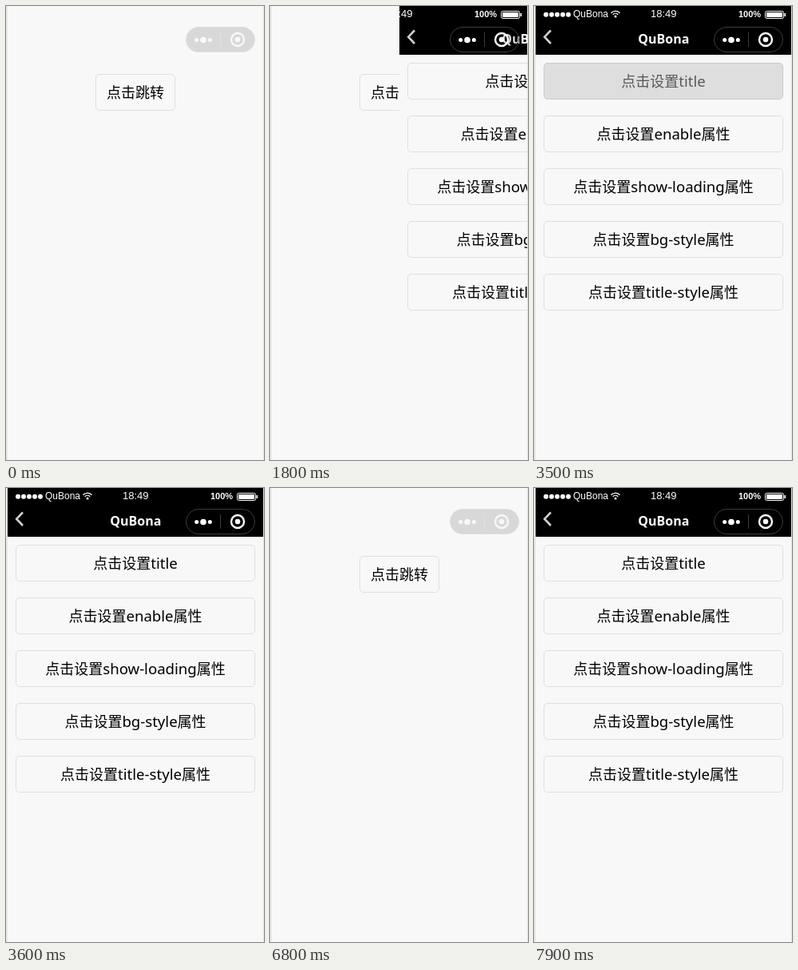
An HTML page with a canvas that plays this animation: 323x568 px, repeating every 8 s.

```html
<!DOCTYPE html>
<html lang="zh">
<head>
<meta charset="utf-8">
<title>Navigation bar demo</title>
<style>
  html, body { margin: 0; width: 100%; height: 100%; overflow: hidden; background: #f8f8f8; }
  canvas { display: block; width: 323px; height: 568px; }
</style>
</head>
<body>
<canvas id="stage"></canvas>
<script>
const W = 323, H = 568, LOOP = 8000, HALF = 160;
const BG = '#f8f8f8';
const SANS = '"Noto Sans", "Noto Sans CJK SC", "Noto Sans CJK", sans-serif';
const CJK = '"Noto Sans CJK SC", "Noto Sans CJK", sans-serif';
const ARIAL = '"Liberation Sans", Arial, sans-serif';
const BRAND = 'QuBona', BRAND_ZH = '岚笺';
const LABELS = ['title', 'enable属性', 'show-loading属性', 'bg-style属性', 'title-style属性'];

const canvas = document.getElementById('stage');
const ctx = canvas.getContext('2d');
const dpr = window.devicePixelRatio || 1;
canvas.width = Math.round(W * dpr);
canvas.height = Math.round(H * dpr);

function rect(x, y, w, h, color) {
  ctx.fillStyle = color;
  ctx.fillRect(x, y, w, h);
}

function disc(x, y, r, color) {
  ctx.fillStyle = color;
  ctx.beginPath();
  ctx.arc(x, y, r, 0, Math.PI * 2);
  ctx.fill();
}

function arc(x, y, r, from, to, width, color) {
  ctx.strokeStyle = color;
  ctx.lineWidth = width;
  ctx.beginPath();
  ctx.arc(x, y, r, from, to);
  ctx.stroke();
}

function roundBox(x, y, w, h, r, fill, stroke) {
  ctx.beginPath();
  ctx.roundRect(x + 0.5, y + 0.5, w - 1, h - 1, r);
  ctx.fillStyle = fill;
  ctx.fill();
  if (stroke) {
    ctx.strokeStyle = stroke;
    ctx.lineWidth = 1;
    ctx.stroke();
  }
}

function text(str, x, y, font, color, align = 'left') {
  ctx.font = font;
  ctx.fillStyle = color;
  ctx.textAlign = align;
  ctx.fillText(str, x, y);
}

// Centres mixed text; Latin runs are set slightly larger than the Chinese ones.
function mixedText(str, cx, y, color) {
  const runs = str.match(/[\x20-\x7e]+|[^\x20-\x7e]+/g).map(s => {
    const font = s.charCodeAt(0) < 128 ? '18.6px ' + SANS : '18px ' + CJK;
    ctx.font = font;
    return { s, font, w: ctx.measureText(s).width };
  });
  let x = cx - runs.reduce((sum, r) => sum + r.w, 0) / 2;
  for (const r of runs) {
    text(r.s, x, y, r.font, color);
    x += r.w;
  }
}

function button(label, x, y, w, pressed) {
  roundBox(x, y, w, 46, 4.5, pressed ? '#dedede' : BG, pressed ? '#cacaca' : '#dfdfdf');
  mixedText(label, x + w / 2, y + 30, pressed ? '#595959' : '#000');
}

function capsule(dark) {
  const icon = dark ? '#fff' : BG;
  roundBox(225, 26, 87, 32, 15.5, dark ? 'rgba(0,0,0,.15)' : '#d8d8d8', dark ? '#3c3c3c' : '#dedede');
  rect(268, 33, 1, 18, dark ? '#3c3c3c' : '#e1e1e1');
  disc(238.7, 42.5, 2.5, icon);
  disc(247, 42.5, 3.8, icon);
  disc(255.3, 42.5, 2.5, icon);
  arc(290, 42, 8, 0, Math.PI * 2, 2.4, icon);
  disc(290, 42, 3.3, icon);
}

function statusBar() {
  for (let i = 0; i < 5; i++) disc(15 + i * 7, 10.7, 3, '#fff');
  text(BRAND, 49, 14, '12px ' + ARIAL, '#fff');
  for (const r of [7.6, 4.6]) arc(102, 14, r, -Math.PI * 0.76, -Math.PI * 0.24, 1.4, '#fff');
  disc(102, 13, 1.5, '#fff');
  text('18:49', 162.3, 14, '13px ' + ARIAL, '#fff', 'center');
  text('100%', 256, 14, 'bold 11px ' + ARIAL, '#fff');
  roundBox(289, 6, 24, 10, 2, '#000', '#fff');
  rect(291, 8, 20, 6, '#fff');
  rect(313.5, 9, 1.5, 4, '#fff');
}

function home(pressed) {
  button('点击跳转', 112, 85, 100, pressed);
}

function detail(shift, title, pressed) {
  ctx.save();
  ctx.beginPath();
  ctx.rect(2 + shift, 0, 320 - shift, H);
  ctx.clip();
  rect(2, 0, 320, H, BG);
  rect(2, 0, 320, 61, '#000');
  statusBar();

  ctx.translate(shift, 0);
  ctx.strokeStyle = '#d0d0d0';
  ctx.lineWidth = 2.6;
  ctx.beginPath();
  ctx.moveTo(21, 30.5);
  ctx.lineTo(13.2, 38.7);
  ctx.lineTo(21, 47);
  ctx.stroke();
  text(title, 162.3, 47, 'bold 16px ' + SANS, '#fff', 'center');
  LABELS.forEach((s, i) => button('点击设置' + s, 12, 71 + i * 66, 300, i === pressed));
  ctx.restore();
}

function draw(t) {
  const during = (from, to) => t >= from && t < to;
  const sliding = during(1800, 1900) || during(7800, 7900);
  const open = during(1800, 6800) || t >= 7800;

  ctx.setTransform(dpr, 0, 0, dpr, 0, 0);
  rect(0, 0, W, H, BG);
  if (!open || sliding) home(during(1100, 1200) || during(7600, 7700));
  if (open) {
    const pressed = during(2800, 2900) || during(3500, 3600) ? 0 : during(5700, 5800) ? 1 : -1;
    detail(sliding ? HALF : 0, during(2800, 3500) ? BRAND_ZH : BRAND, pressed);
  }
  capsule(open);
  rect(0, 0, 2, H, '#e6e6e6');
  rect(322, 0, 1, H, '#e2e2e2');
}

function tick() {
  draw(performance.now() % LOOP);
  requestAnimationFrame(tick);
}
tick();
</script>
</body>
</html>
```
